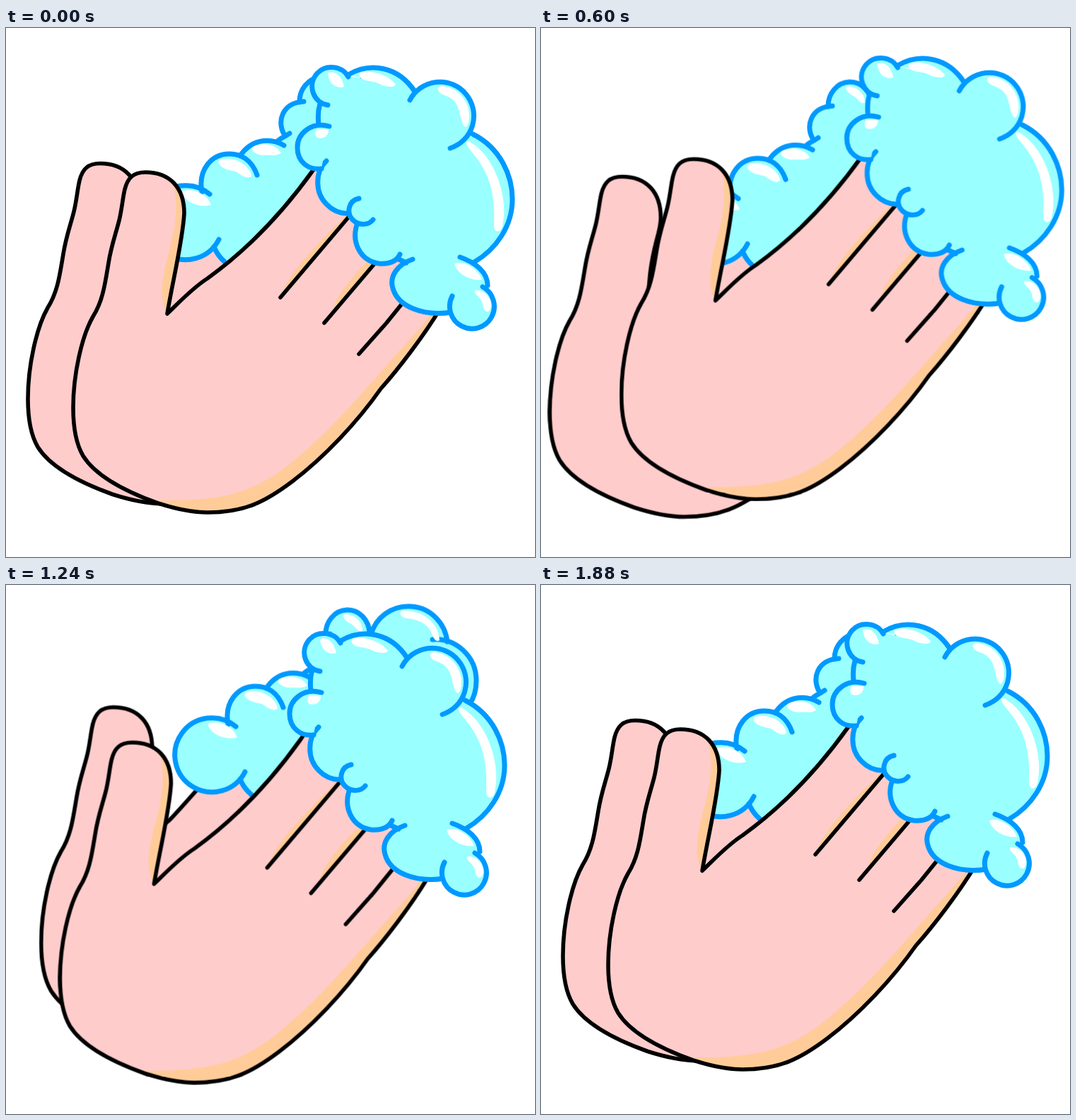
These frames come from a looping animation (748x748 px, 1.92 s). An HTML page:

```html
<!DOCTYPE html>
<html lang="en">
<head>
<meta charset="utf-8">
<title>Washing hands</title>
<style>
  html, body { margin: 0; width: 100%; height: 100%; overflow: hidden; background: #fff; }
  svg { display: block; width: 100vw; height: 100vh; }
  path { stroke-linecap: round; stroke-linejoin: round; }
  .skin { fill: #fcc; }
  .line { fill: none; stroke: #000; stroke-width: 5.6; }
  .shade { fill: #fc9; }
  .foam { fill: #9ff; stroke: #9ff; stroke-width: 3; }
  .edge { fill: #9ff; stroke: #09f; stroke-width: 7; }
  .shine { fill: #fff; }

  /* 25 poses a second: 11 out, 12 back, 12 across, 12 home, one held */
  .move { animation: rub 1920ms -2ms infinite steps(12, end); }
  .hand      { --ax: 28px;   --ay: -28px;   --bx: 0px;  --by: 0px;     --cx: -28px;   --cy: 28px; }
  .back-hand { --ax: -28px;  --ay: 28px;    --bx: 0px;  --by: 0px;     --cx: 28px;    --cy: -28px; }
  .suds      { --ax: 30.5px; --ay: -19.6px; --bx: 0px;  --by: 0px;     --cx: -16.5px; --cy: 19.5px; }
  .back-suds { --ax: -22px;  --ay: 19.6px;  --bx: 17px; --by: -20.5px; --cx: 47px;    --cy: -42px; }
  @keyframes rub {
    0% { transform: translate(0, 0); animation-timing-function: steps(11, end); }
    22.91667% { transform: translate(var(--ax), var(--ay)); }
    47.91667% { transform: translate(var(--bx), var(--by)); }
    72.91667% { transform: translate(var(--cx), var(--cy)); }
    97.91667%, 100% { transform: translate(0, 0); }
  }
</style>
</head>
<body>
<svg viewBox="0 0 748 748">
  <defs>
    <path id="palm" d="M228 404C236 356 250 300 252 262C252 226 232 204 197 204C180 204 172 212 168 228
      C165 240 164 256 160 272C155 292 149 307 145 332C140 362 137 386 123 408C107 436 95 490 95 537
      C95 565 99 588 109 605C129 637 176 658 215 672C240 680 262 685 285 685C335 685 364 672 405 641
      C450 607 497 557 530 510C555 482 590 436 612 400L632 370L455 170L435 200
      C385 270 335 318 285 354C263 368 245 388 228 404Z"/>
  </defs>

  <g class="move back-hand">
    <path class="line" style="fill:#fcc" transform="translate(-64 -12.5)"
      d="M234 404C234 350 238 325 246 294C250 280 252 270 252 262C252 226 232 204 197 204C180 204 172 212 168 228
      C165 240 164 256 160 272C155 292 149 307 145 332C140 362 137 386 123 408C107 436 95 490 95 537
      C95 565 99 588 109 605C129 637 176 658 215 672C240 680 262 685 285 685C335 685 364 672 405 641
      C450 607 497 557 530 510C555 482 590 436 612 400L632 370L385 243
      C335 297 295 345 276 364C260 376 248 388 234 404Z"/>
  </g>

  <g class="move back-suds">
    <g transform="translate(-37 35)">
      <path class="foam" d="M325 200L314 197L392 173L368 146L430 131L420 126L438 114L432 118L458 69L452 70
        L514 68L624 80L603 77L656 168L600 250L450 320L362 306L331 274L338 264Z"/>
      <path class="edge" d="M325 200A52.5 52.5 0 1 0 338 264M331 274C335 285 345 298 362 306
        M392 173C384 150 368 143 353 143C328 143 308 165 314 197
        M368 146C382 124 408 118 430 131M438 114C431 119 424 121 420 126
        M458 69C428 70 418 98 432 118M452 70A31 34 0 0 1 514 68
        M516 70C523 45 545 30 569 30C600 30 621 54 624 80
        M603 77C635 74 665 100 665 135C665 150 661 160 656 168"/>
      <path class="shine" d="M288 195C306 191 322 202 327 215C316 219 302 215 294 209C288 204 283 197 288 195Z
        M341 151C362 146 382 160 384 174C380 180 370 174 362 168C352 166 342 164 338 157C337 153 339 152 341 151Z
        M386 133C402 125 420 131 426 142C418 147 408 144 400 145C390 144 382 138 386 133Z
        M480 41C494 42 504 52 504 64C498 68 496 60 488 55C478 50 474 42 480 41Z
        M562 36C592 36 612 55 613 78C606 82 604 72 600 64C592 52 580 48 566 47C556 44 555 37 562 36Z"/>
    </g>
  </g>

  <g class="move hand">
    <use href="#palm" class="skin"/>
    <path class="shade" d="M235 216C256 226 256 262 246 305L228 404C216 385 220 355 228 325C238 290 246 250 235 216Z
      M212 668C300 669 340 660 390 625C450 580 500 520 540 475C570 440 600 410 606 396L612 400
      C590 436 555 482 530 510C497 557 450 607 405 641C364 672 335 685 285 685C262 685 240 680 212 671Z
      M388 381L500 249L484 262C440 305 400 345 388 381Z
      M462 402L535 317L512 328C490 352 464 380 462 402Z"/>
    <use href="#palm" class="line"/>
    <path class="line" d="M388 381L505 243M450 417L540 311M499 461L538 417L580 365"/>
  </g>

  <g class="move suds">
    <path class="foam" d="M455 109L484 69L578 90L571 102L628 170L660 150L662 331L642 324L681 364L674 366L631 379
      L630 402L575 327L566 332L553 326L498 273L519 271L499 241L486 262L453 188L446 199L457 139L442 136L444 107Z"/>
    <path class="edge" d="M484 66C515 48 555 54 578 90M660 150C700 170 716 210 716 242C716 280 693 313 662 331
      M642 324C665 332 681 346 681 364M575 327C552 335 542 352 547 368C554 394 590 408 630 402
      M553 326L566 332M557 320C552 331 540 334 527 333C501 329 486 302 498 273
      M453 188C437 203 436 233 454 250C463 259 474 263 486 262M444 107C441 117 441 127 442 136"/>
    <path class="edge" d="M484 69C475 53 452 51 440 64C425 81 435 106 455 109
      M571 102A48 48 0 1 1 628 170M674 366A31.5 31.5 0 1 1 631 379
      M499 241C484 244 481 262 490 271C499 280 513 279 519 271
      M457 139C432 132 412 149 412 169C412 190 428 201 446 199"/>
    <path class="shine" d="M455 64C462 60 474 64 478 83C470 86 457 82 455 64Z
      M502 63C520 58 545 70 551 80C548 86 532 82 526 78C516 74 506 76 501 70C499 67 499 64 502 63Z
      M614 82C640 82 660 108 654 134C650 146 645 138 642 122C638 104 632 100 620 95C610 92 608 84 614 82Z
      M654 160C690 178 712 240 702 280C700 290 690 290 690 280C692 235 685 205 656 172C650 164 650 160 654 160Z
      M634 333C650 328 668 342 673 356C660 358 638 350 634 333Z
      M663 371C676 368 690 384 685 397C682 404 675 402 674 390C672 380 660 376 663 371Z
      M440 143L456 143C457 153 448 158 440 155C436 152 437 145 440 143Z"/>
  </g>
</svg>
</body>
</html>
```
